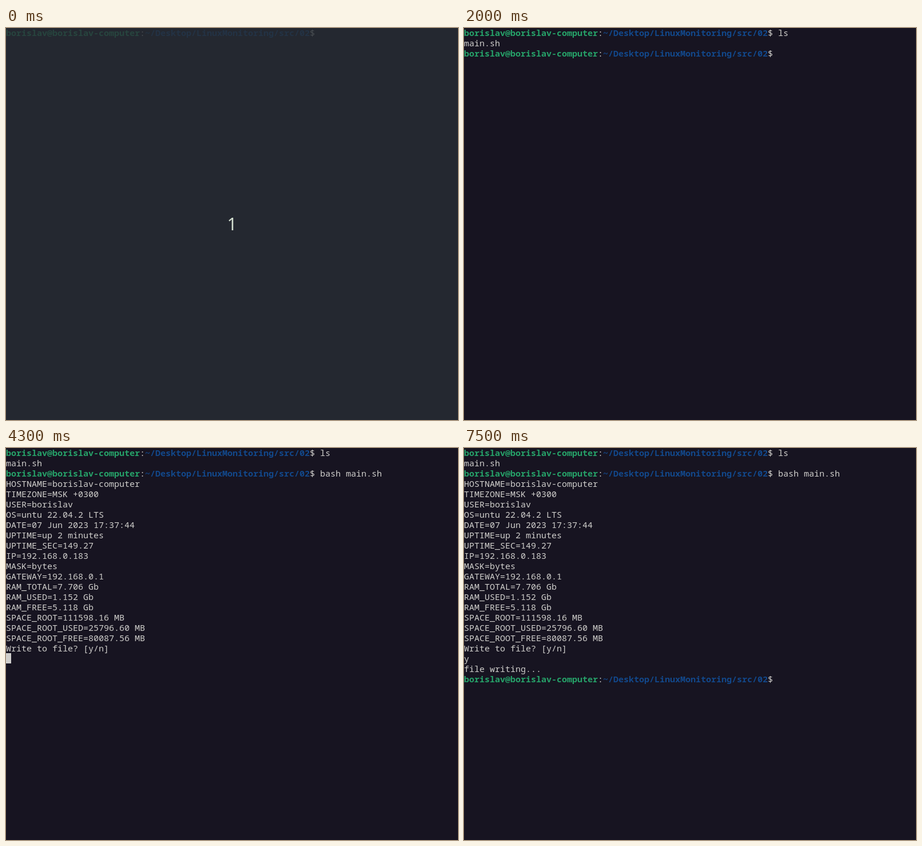
Animation of 790x686 px, one loop 8000 ms. Source, as an HTML page:

```html
<!DOCTYPE html>
<html lang="en">
<head>
<meta charset="utf-8">
<title>Terminal session</title>
<style>
  html, body { margin: 0; width: 100%; height: 100%; overflow: hidden; background: #171421; }
  #screen {
    position: absolute; left: 0; top: -1px; margin: 0;
    font: 15px/18px "Noto Sans Mono", monospace;
    font-variant-ligatures: none; color: #d0cfcc;
  }
  .user { color: #26a269; }
  .path { color: #12488b; }
  .cursor { display: inline-block; width: 9px; height: 18px; vertical-align: top; background: #d0cfcc; }
  #countdown {
    position: absolute; inset: 0; background: rgba(39, 45, 52, .8); color: #d3dfd0;
    font: 30px/686px "Noto Sans", sans-serif; text-align: center;
  }
</style>
</head>
<body>
<pre id="screen"></pre>
<div id="countdown">1</div>
<script>
const LOOP = 8000, COUNTDOWN_END = 100;
const user = 'borislav', host = user + '-computer';
const prompt = `<b class="user">${user}@${host}</b>:<b class="path">~/Desktop/LinuxMonitoring/src/02</b>$ `;
const report = `HOSTNAME=${host}
TIMEZONE=MSK +0300
USER=${user}
OS=untu 22.04.2 LTS
DATE=07 Jun 2023 17:37:44
UPTIME=up 2 minutes
UPTIME_SEC=149.27
IP=192.168.0.183
MASK=bytes
GATEWAY=192.168.0.1
RAM_TOTAL=7.706 Gb
RAM_USED=1.152 Gb
RAM_FREE=5.118 Gb
SPACE_ROOT=111598.16 MB
SPACE_ROOT_USED=25796.60 MB
SPACE_ROOT_FREE=80087.56 MB
Write to file? [y/n]
`;

// [time in ms, text appended, cursor visible]
const steps = [
  [0, prompt, false],
  [600, '', true],
  [1000, 'l', true],
  [1200, 's', true],
  [1400, '\nmain.sh\n' + prompt, true],
  [2000, '', false],
  [2600, '', true],
  [2900, 'b', true],
  [3000, 'a', true],
  [3200, 's', true],
  [3300, 'h', true],
  [3500, ' ', true],
  [3600, 'main.sh ', true],
  [4100, '\n', true],
  [4300, report, true],
  [4700, '', false],
  [5300, '', true],
  [5900, '', false],
  [6100, '', true],
  [6200, 'y', true],
  [6700, '', false],
  [6900, '\n', true],
  [7000, 'file writing...\n' + prompt, true],
  [7500, '', false],
];

const screenEl = document.getElementById('screen');
const countdownEl = document.getElementById('countdown');
let shown = 0;

function draw() {
  const t = performance.now() % LOOP;
  const past = steps.filter(([time]) => time <= t);
  if (past.length !== shown) {
    shown = past.length;
    const cursor = past[shown - 1][2] ? '<span class="cursor"></span>' : '';
    screenEl.innerHTML = past.map(([, text]) => text).join('') + cursor;
  }
  countdownEl.hidden = t >= COUNTDOWN_END;
  requestAnimationFrame(draw);
}
draw();
</script>
</body>
</html>
```
